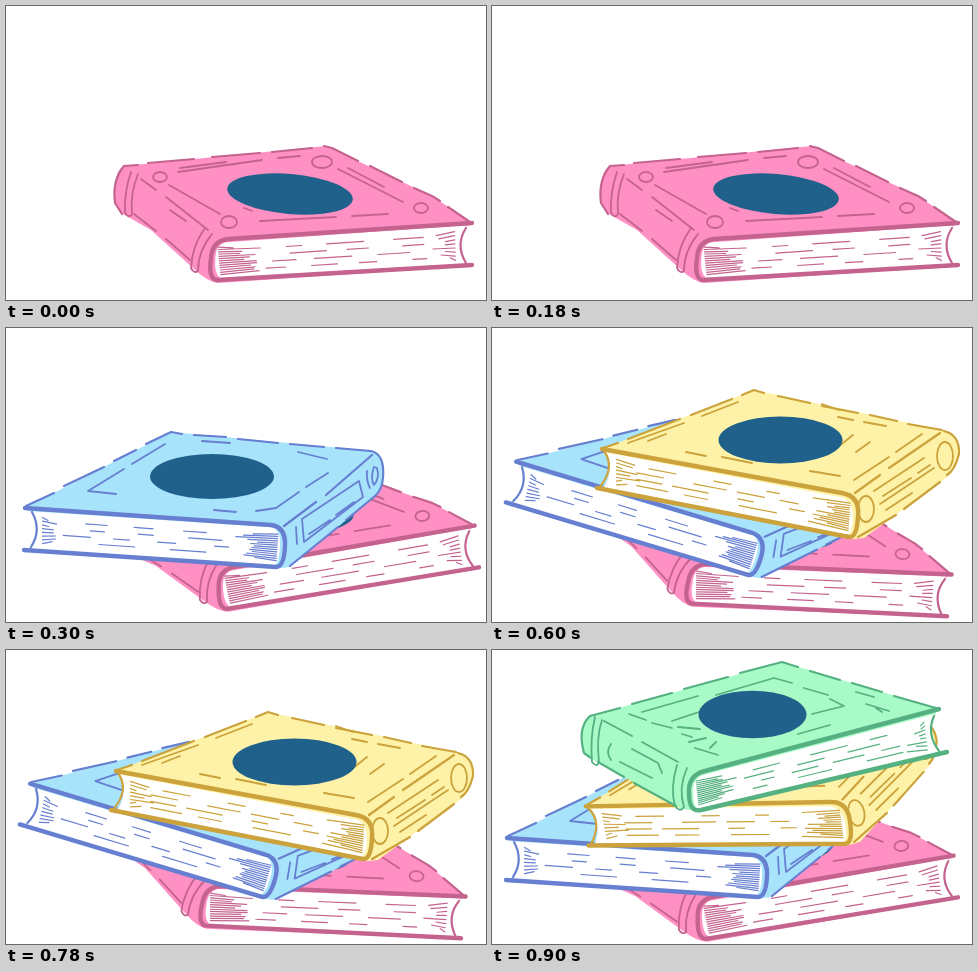
An HTML page that plays this animation: 480 by 294 pixels, repeating every 1.2 s.

```html
<!DOCTYPE html>
<html lang="en">
<head>
<meta charset="utf-8">
<title>Stack of books</title>
<style>
html, body { margin: 0; width: 100%; height: 100%; overflow: hidden; background: #fff; }
svg { display: block; width: 100%; height: 100%; }
path { stroke-linecap: round; stroke-linejoin: round; }
</style>
</head>
<body>
<svg id="stage" viewBox="0 0 480 294"></svg>
<script>
const STEP = 300;

// pin: turning point; front: thick cover edge; leaf: page block corners
// from the spine side (top, bottom) to the open side (top, bottom).
const books = [
  {
    fill: '#ff90c3', ink: '#c5638f', pin: [212, 236],
    body: 'M118 160L320 140L426 190L466 217L460 221Q449 240 460 258L466 260L212 277Q202 276 188 263L145 224L117 208Q106 198 109 180Q110 164 118 160Z',
    pages: 'M460 220L220 237Q210 239 210 254Q209 269 216 272L460 258Q449 240 460 220Z',
    front: 'M466 217L222 233Q206 235 205 252Q202 273 211 274L466 259',
    edge: 'M460 222Q449 239 460 257M118 160Q106 174 109 197L116 208M118 160L132 159M142 157L188 153M206 151L254 147M266 146L306 142M318 140L326 142L352 155M364 160L396 176M408 182L426 190L434 195M442 201L464 216',
    detail: 'M125 166Q118 186 119 207Q123 213 126 208Q124 188 132 168M199 222Q186 240 185 262Q188 268 192 265Q192 245 206 228M135 173L150 184M160 191L202 224M128 208L150 225M160 233L184 254M163 179L214 208M172 166L256 154M174 162L220 156M272 152L294 150M332 163L397 196M342 162L378 181M254 215L330 211M346 210L382 208M238 202L246 205M164 204L180 215M212 160L230 158',
    rings: [[154, 171, 7, 5], [316, 156, 10, 6], [223, 216, 8, 6], [415, 202, 7, 5]],
    badge: [284, 188, 63, 20, 5],
    leaf: [[212, 240], [215, 270], [457, 223], [458, 256]]
  },
  {
    fill: '#a8e3fc', ink: '#667fd0', pin: [275, 197],
    body: 'M19 180L165 104L368 123Q378 127 377 150Q376 162 369 168L284 239L276 240L18 222L25 219Q36 202 25 184Z',
    pages: 'M25 184L266 200Q275 204 273 221Q272 236 267 237L25 220Q36 202 25 184Z',
    front: 'M19 180L265 197Q280 199 279 218Q278 239 270 239L18 222',
    edge: 'M26 184Q36 202 25 219M20 178L48 165M58 158L98 139M108 133L130 122M140 116L165 104L176 106M188 107L220 109M232 111L272 115M284 116L318 119M330 120L365 123Q379 126 377 150Q376 162 369 168L340 192M332 199L284 238M278 198L310 174M320 167L366 127',
    detail: 'M159 116L126 136M118 141L82 163L110 166M196 113L224 115M292 124L321 131M322 145L300 159M293 164L270 180L250 183M230 184L208 182M296 191L353 153L357 169L298 214ZM303 206L324 192M330 187L348 174M290 199L291 216M361 143Q360 152 364 160M368 139Q364 150 368 157Q374 150 371 140Z',
    rings: [],
    badge: [206, 148.5, 62, 22.5, 0],
    leaf: [[272, 205], [270, 234], [28, 187], [28, 217]]
  },
  {
    fill: '#fdf2a7', ink: '#cba23b', pin: [365, 168],
    body: 'M110 121L262 62L455 103Q468 108 467 126Q465 142 455 149L372 210L362 211L105 160L113 158Q123 142 113 124Z',
    pages: 'M113 125L349 170Q361 174 360 190Q360 207 352 207L113 159Q123 142 113 125Z',
    front: 'M110 121L350 165Q368 168 366 188Q365 210 357 209L105 160',
    edge: 'M112 123Q124 140 107 160M111 120L126 115M136 111L188 91M199 87L240 71M250 67L262 62L272 65M286 68L318 75M330 78L366 85M378 87L405 93M416 96L450 102M452 103Q468 107 467 126Q463 142 455 147M448 154L412 181M404 187L366 209M363 165L388 147M397 140L448 105',
    detail: 'M136 115L192 95M156 113L174 106M210 88L246 74M330 76L347 82M372 94L394 98M430 106L404 124M397 129L362 152M348 148L318 143M361 107L341 123M378 114L364 124M230 129L260 135M382 163L432 130M388 176L442 140M391 168L419 150M426 145L438 137M394 182L420 165M346 89L361 92M194 124L214 128',
    rings: [[374, 181, 8, 13], [453, 128, 8, 14]],
    badge: [288.5, 112, 62, 23.5, 0],
    leaf: [[358, 174], [356, 204], [116, 128], [116, 157]]
  },
  {
    fill: '#a8fac7', ink: '#55b181', pin: [205, 124],
    body: 'M98 66L290 12L447 59L442 66Q434 84 447 101L455 102L211 162L190 159L96 107Q86 96 91 76Q93 68 98 66Z',
    pages: 'M442 65L214 125Q200 128 202 145Q202 160 210 158L447 102Q434 84 442 65Z',
    front: 'M447 59L213 121Q196 125 197 143Q197 163 209 160L455 102',
    edge: 'M442 66Q434 84 447 101M98 66Q85 78 92 103L99 108M98 66L128 58M140 54L180 43M192 39L236 27M248 23L290 12L306 17M318 21L348 30M360 33L390 42M402 46L444 58M106 112L132 127M142 133L184 156',
    detail: 'M103 67Q98 88 100 112Q105 118 107 112Q104 88 110 70M185 115Q178 138 183 156Q188 163 192 157Q186 138 195 118M112 71L140 86M150 92L186 112M137 64L154 70M160 73L180 78M180 71L222 57M186 77L208 79M224 45L282 28L300 33M312 38L336 45M320 64L352 56L338 49M364 42L382 47M374 54L397 61M384 58L390 62M197 92L214 88M203 98L226 105M218 98L224 92M306 84L338 75M150 62L206 46M119 94Q113 102 119 110M140 99L166 113L170 123M128 112L160 128M190 84L200 87',
    rings: [],
    badge: [260.5, 64.5, 54, 23.8, 0],
    leaf: [[204, 130], [207, 156], [440, 68], [444, 100]]
  }
];

// Each step: [x, y, turn] of the pin, one per book in the stack.
const poses = [
  [[212, 236, 0]],
  [[218, 243, -6], [275, 197, 0]],
  [[205, 238, 6.2], [270, 207, 12.8], [365, 168, 0]],
  [[211, 251, -6], [271, 205, 0], [353, 152, -11.4], [205, 124, 0]]
];

let seed = 7;
const rand = (lo, hi) => {
  seed = seed * 16807 % 2147483647;
  return lo + (hi - lo) * seed / 2147483647;
};
const mix = (p, q, t) => p.map((v, i) => v + (q[i] - v) * t);

// Fanned strokes at both ends of the page block, loose long dashes between.
function pageLines([a, b, c, d]) {
  let path = '';
  const line = (s, e, v, w = v) => {
    const at = (u, t) => mix(mix(a, c, u), mix(b, d, u), t).map(n => n.toFixed(1)).join(' ');
    path += `M${at(s, v)}L${at(e, w)}`;
  };
  for (let i = 0; i < 13; i++) {
    const v = 0.04 + i * 0.076;
    line(0, rand(0.06, 0.18), v, mix([v], [0.5], 0.12)[0]);
  }
  for (let i = 0; i < 8; i++) {
    const v = 0.06 + i * 0.125;
    line(rand(0.87, 0.95), 0.965, mix([v], [0.5], 0.2)[0], v);
  }
  for (let i = 0; i < 4; i++) {
    for (let u = rand(0.18, 0.3); u < 0.8; u += rand(0.04, 0.16)) {
      const end = u + rand(0.05, 0.16);
      line(u, Math.min(end, 0.88), 0.17 + i * 0.22);
      u = end;
    }
  }
  return path;
}

const oval = ([x, y, rx, ry, turn = 0], style) =>
  `<ellipse cx="${x}" cy="${y}" rx="${rx}" ry="${ry}" transform="rotate(${turn} ${x} ${y})" ${style}/>`;

const stage = document.getElementById('stage');
stage.innerHTML = books.map(b => `<g fill="none" stroke="${b.ink}">
  <path d="${b.body}" fill="${b.fill}" stroke="none"/>
  <path d="${b.pages}" fill="#fff" stroke="#fff" stroke-width="1.5"/>
  <path d="${pageLines(b.leaf)}" stroke-width="1.2"/>
  <path d="${b.detail}" stroke-width="1.8"/>
  ${b.rings.map(r => oval(r, 'stroke-width="1.8"')).join('')}
  <path d="${b.edge}" stroke-width="2.2"/>
  <path d="${b.front}" stroke-width="4.4"/>
  ${oval(b.badge, 'fill="#1f618a" stroke="none"')}
</g>`).join('');
const groups = [...stage.children];

function draw() {
  const pose = poses[Math.floor(performance.now() / STEP) % poses.length];
  groups.forEach((g, i) => {
    g.style.display = pose[i] ? '' : 'none';
    if (!pose[i]) return;
    const [x, y, turn] = pose[i];
    const [px, py] = books[i].pin;
    g.setAttribute('transform', `translate(${x} ${y}) rotate(${turn}) translate(${-px} ${-py})`);
  });
  requestAnimationFrame(draw);
}
draw();
</script>
</body>
</html>
```
